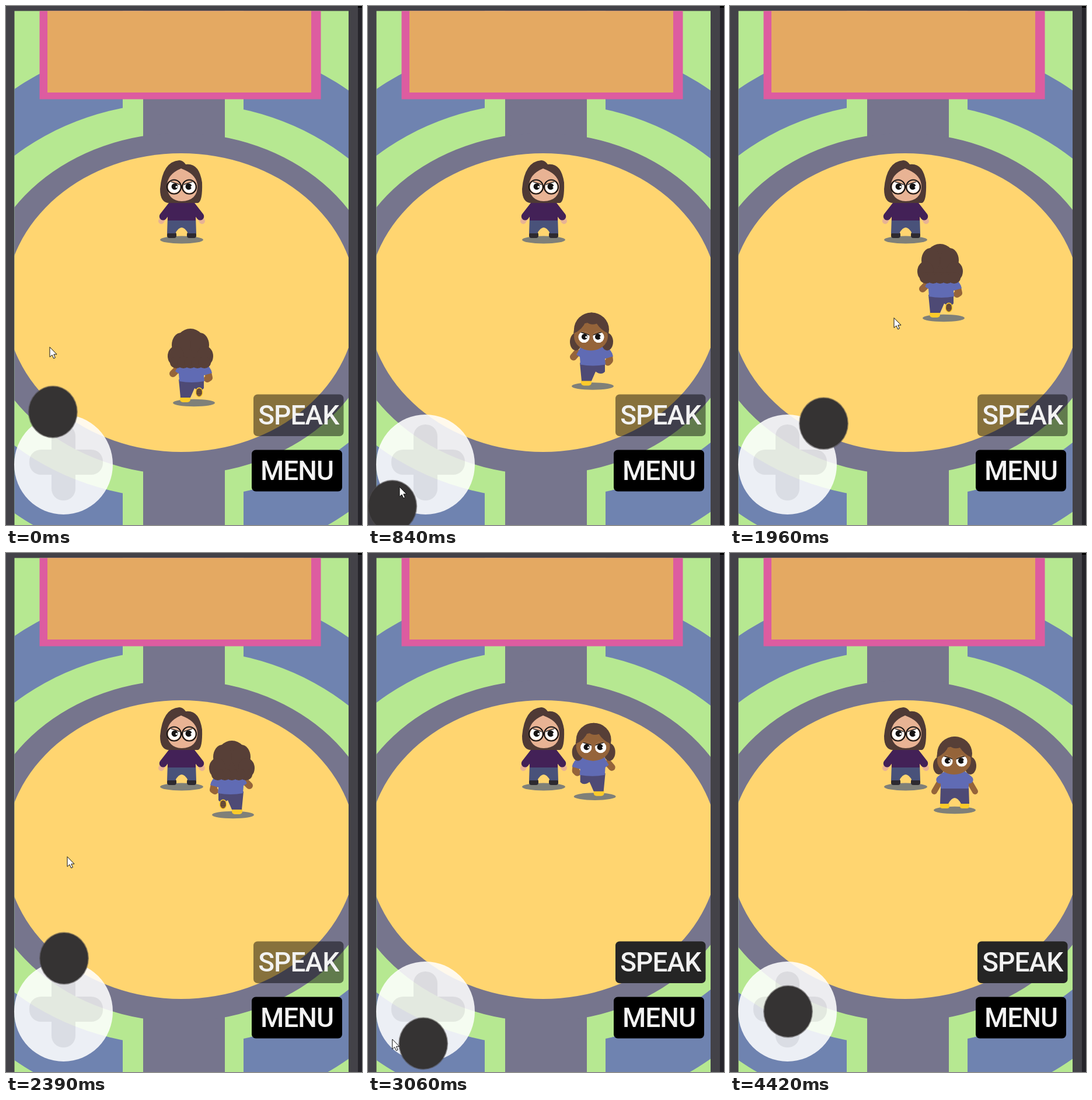
Recreate the animation shown at these times as an HTML page with a canvas. Size 610x888 px, loop 4520 ms.

```html
<!DOCTYPE html>
<html lang="en">
<head>
<meta charset="utf-8">
<title>Arena walk</title>
<style>
html, body { margin: 0; width: 100%; height: 100%; overflow: hidden; background: #434248; }
canvas { display: block; }
</style>
</head>
<body>
<canvas id="stage" width="610" height="888"></canvas>
<script>
const g = document.getElementById('stage').getContext('2d');
const LOOP = 4520, STEP = 140, LEAD = 20;
const C = {
  frame: '#434248', green: '#b6e891', blue: '#6f83b0', path: '#76758d', sand: '#ffd570',
  shadow: '#7f8079', ink: '#151313'
};
const hero = { hair: '#573f37', skin: '#95643a', top: '#606bb4', pants: '#4e4a75', shoe: '#fccb2b', hem: -37, sleeve: .2 };
const host = { hair: '#4f3a35', skin: '#e8b394', top: '#432157', pants: '#49527a', shoe: '#2d2a30', hem: -33, sleeve: .8 };
const PAD = { x: 98.5, y: 784.5 };

// Turning points as [step, a, b]; everything between is interpolated.
const walkKeys = [
  [0, 316, 679], [1, 316, 646], [3, 369, 598], [5, 408, 628], [7, 358, 673],
  [9, 294, 673], [10, 294, 646], [14, 360, 534], [16, 386, 474], [20, 390, 370], [23, 385, 440]
];
// angle in degrees, distance from the pad's centre
const stickKeys = [
  [0, -102, 92], [1, -70, 92], [3, -10, 94], [5, 95, 92], [9, 231, 91], [10, 274, 88],
  [14, 311, 93], [17, 270, 91], [18, 270, 90], [20, 250, -26], [22, 275, -55], [24, 270, 0]
];
const pointerKeys = [
  [0, 75, 584], [3, 217, 791], [5, 100, 866], [7, 8, 780], [9, 32, 630],
  [11, 180, 545], [14, 281, 534], [17, 105, 520], [20, 109, 837], [23, 8, 830], [25, 46, 779]
];

function along(keys, n) {
  const next = keys.findIndex(k => k[0] > n);
  if (next < 0) return keys[keys.length - 1].slice(1);
  const a = keys[next - 1], b = keys[next];
  const k = (n - a[0]) / (b[0] - a[0]);
  return [a[1] + (b[1] - a[1]) * k, a[2] + (b[2] - a[2]) * k];
}

function stickAt(n) {
  const [degrees, reach] = along(stickKeys, n);
  const angle = degrees * Math.PI / 180;
  return { x: Math.cos(angle) * reach, y: Math.sin(angle) * reach };
}

function rect(fill, x, y, w, h, r = 0) {
  g.fillStyle = fill;
  g.beginPath();
  g.roundRect(x, y, w, h, r);
  g.fill();
}
function oval(fill, x, y, rx, ry = rx) {
  g.fillStyle = fill;
  g.beginPath();
  g.ellipse(x, y, rx, ry, 0, 0, 7);
  g.fill();
}
function shape(fill, d) {
  g.fillStyle = fill;
  g.fill(new Path2D(d));
}
function line(color, width, d) {
  g.strokeStyle = color;
  g.lineWidth = width;
  g.lineCap = g.lineJoin = 'round';
  g.stroke(new Path2D(d));
}
function at(x, y, flip, paint) {
  g.save();
  g.translate(x, y);
  if (flip) g.scale(-1, 1);
  paint();
  g.restore();
}

function arena() {
  rect(C.frame, 0, 0, 610, 888);
  rect('#26252b', 603, 0, 7, 888);
  rect('#000', 603, 0, 7, 3);
  g.save();
  g.beginPath();
  g.rect(14.5, 8.5, 572.5, 880);
  g.clip();
  rect(C.green, 0, 0, 610, 888);
  oval(C.blue, 299, 505, 481, 450);
  oval(C.green, 297.5, 504, 415, 339);
  rect(C.green, 200, 0, 207, 888);
  rect(C.path, 235, 0, 140, 888);
  oval(C.path, 299, 509.5, 345, 292);
  oval(C.sand, 300, 507.5, 301, 255.5);
  rect('#dd5ca0', 57.5, 0, 482, 159.5);
  rect('#e4a962', 71, 0, 452, 148);
  g.restore();
}

// inner: +1 when the nose lies to the right of the eye, -1 when to the left
function eye(x, y, r, inner, skin) {
  g.save();
  g.beginPath();
  g.arc(x, y, r, 0, 7);
  g.clip();
  oval('#fff', x, y, r);
  oval(C.ink, x + inner * r * .1, y - r * .05, r * .52);
  oval('#fff', x + r * .4, y, r * .17);
  shape(skin, `M${x - inner * r} ${y - r}L${x + inner * r} ${y - r * .35}V${y - r}Z`);
  line(C.ink, 1.3, `M${x - inner * r} ${y - r}L${x + inner * r} ${y - r * .35}`);
  g.restore();
}

function standing(look) {
  for (const s of [-1, 1]) {
    const cuffX = s * (23 + 11 * look.sleeve), cuffY = -54 + 20 * look.sleeve;
    line(look.skin, 10, `M${s * 24} -51L${s * 35} -32`);
    line(look.top, 13, `M${s * 17} -59L${cuffX} ${cuffY - 2}`);
    rect(look.shoe, s * 17 - 8, -13, 16, 10, 4);
  }
  shape(look.pants, 'M-24-40H24L25-11H11Q0-31-11-11H-25Z');
  shape(look.top, `M-18-67H18L24-50V${look.hem}H-24V-50Z`);
}

function frontHead() {
  const { hair, skin } = hero;
  oval(hair, 0, -97, 30, 29);
  for (const s of [-1, 1]) oval(hair, s * 27, -76, 10, 15);
  oval(skin, -1, -85, 29, 24);
  shape(hair, 'M-31-90Q-15-97-10-111Q-2-103 9-107Q16-96 29-90Q29-122 0-126Q-28-122-31-90Z');
  eye(-13, -84, 9.8, 1, skin);
  eye(12, -84, 9.8, -1, skin);
}

function hostFigure() {
  oval(C.shadow, 0, 0, 37, 6.5);
  standing(host);
  shape(host.hair, 'M-4-136Q-33-134-37-87Q-37-62-20-63H28Q36-66 35-98Q30-132 7-129Q2-136-4-136Z');
  shape(host.skin, 'M-1-122Q-25-112-25-92Q-24-67 0-66Q27-67 27-92Q26-110 6-119Z');
  for (const s of [-1, 1]) {
    eye(s * 13, -90.5, 10.5, -s, host.skin);
    g.strokeStyle = C.ink;
    g.lineWidth = 2.2;
    g.beginPath();
    g.arc(s * 13, -90.5, 12, 0, 7);
    g.stroke();
  }
}

function runningBody(arms) {
  line(hero.skin, 12, arms);
  rect(hero.shoe, -18, -13, 18, 12, 5);
  shape(hero.pants, 'M-20-40H23V-25Q17-18 7-25L0-9H-17Z');
  shape(hero.top, 'M-18-68H24Q35-62 37-51L23-47L24-37Q2-33-19-37L-20-50L-26-54Z');
}

function runFront() {
  runningBody('M-25-57L-31-50M30-53L31-44L28-41');
}

function runBack() {
  runningBody('M-24-56L-30-50M30-52L32-43L29-41');
  oval(hero.shoe, 15, -18, 6.5, 8.5);
  oval('#775238', 15, -18, 5, 7);
  for (let y = -22; y < -13; y += 3) line('#493a35', 1, `M11 ${y}H19`);
  oval(hero.hair, 0, -99, 26, 28);
  for (const s of [-1, 1]) {
    oval(hero.hair, s * 16, -99, 16, 21);
    oval(hero.hair, s * 25, -80, 14, 17);
  }
  for (let x = -24; x <= 24; x += 12) oval(hero.hair, x, -69, 11, 10);
}

function runSide() {
  const { hair, skin, top, pants, shoe } = hero;
  oval(shoe, 0, -2, 7, 5);
  shape(pants, 'M-14-31H17Q17-15 8-5H-7Q-14-16-14-31Z');
  shape(top, 'M-9-64H13Q18-48 17-29Q2-26-15-29Q-16-48-9-64Z');
  oval(skin, 0, -33, 9, 7);
  shape(skin, 'M29-112Q34-98 32-79C27-64 16-56 1-60L-4-86L15-106Z');
  shape(hair, 'M5-127C-14-125-27-117-33-103Q-37-90-44-85C-52-80-50-67-40-64Q-32-52-19-58Q-12-55-8-62C4-58 9-69 5-76Q-5-80-1-82Q13-92 26-109L31-104Q31-123 5-127Z');
  eye(21, -88, 10.5, 1, skin);
}

// The stick decides which way the hero faces.
function heroFigure(n) {
  const [x, y] = along(walkKeys, n);
  const stick = stickAt(n);
  const still = Math.hypot(stick.x, stick.y) < 5;
  const sideways = Math.abs(stick.x) > Math.abs(stick.y);
  const flip = Math.floor(n * .58) % 2 === 1;
  const away = stick.y < 0;
  const shift = still || sideways ? 0 : away && !flip ? 6 : 2;
  oval(C.shadow, x + shift, y, 36, 6.3);
  if (still) at(x, y, false, () => { standing(hero); frontHead(); });
  else if (sideways) at(x, y, stick.x < 0, runSide);
  else if (away) at(x, y, flip, runBack);
  else {
    at(x, y, !flip, runFront);
    at(x, y, false, frontHead);
  }
}

function button(label, x, y, w, h, fill) {
  rect(fill, x, y, w, h, 7);
  g.fillStyle = '#f2f2f2';
  g.font = '500 46px Roboto, sans-serif';
  g.letterSpacing = '-1px';
  g.textAlign = 'center';
  g.fillText(label, x + w / 2, y + 51.5);
}

function joystick(n) {
  oval('rgba(255,255,255,.87)', PAD.x, PAD.y, 84.5, 85.5);
  const cross = new Path2D();
  cross.roundRect(78, 716, 41, 130, 20);
  cross.roundRect(40, 759, 126, 43, 20);
  g.fillStyle = 'rgba(0,0,20,.075)';
  g.fill(cross);
  const { x, y } = stickAt(n);
  oval('rgba(75,73,73,.6)', PAD.x + 1 + x, PAD.y + y, 42.5, 45);
  oval('#353333', PAD.x + 1 + x, PAD.y + y, 41, 43.5);
}

function cursor(n) {
  const arrow = 'M0 0V16.5L4 13L6.7 19L9.4 17.8L6.8 12H11.7Z';
  at(...along(pointerKeys, n), false, () => {
    shape('#fff', arrow);
    line('#111', 1, arrow);
  });
}

function draw(time) {
  const n = Math.floor((time + LEAD) / STEP);
  arena();
  const behind = along(walkKeys, n)[1] < 400;
  if (behind) heroFigure(n);
  at(301, 400, false, hostFigure);
  if (!behind) heroFigure(n);
  button('SPEAK', 424, 664.5, 154.5, 71.5, n < 19 ? 'rgba(0,0,0,.47)' : '#252525');
  button('MENU', 421, 759.5, 155, 71, '#000');
  joystick(n);
  if (n < 26) cursor(n);
}

const start = performance.now();
function tick() {
  draw((performance.now() - start) % LOOP);
  requestAnimationFrame(tick);
}
tick();
</script>
</body>
</html>
```
